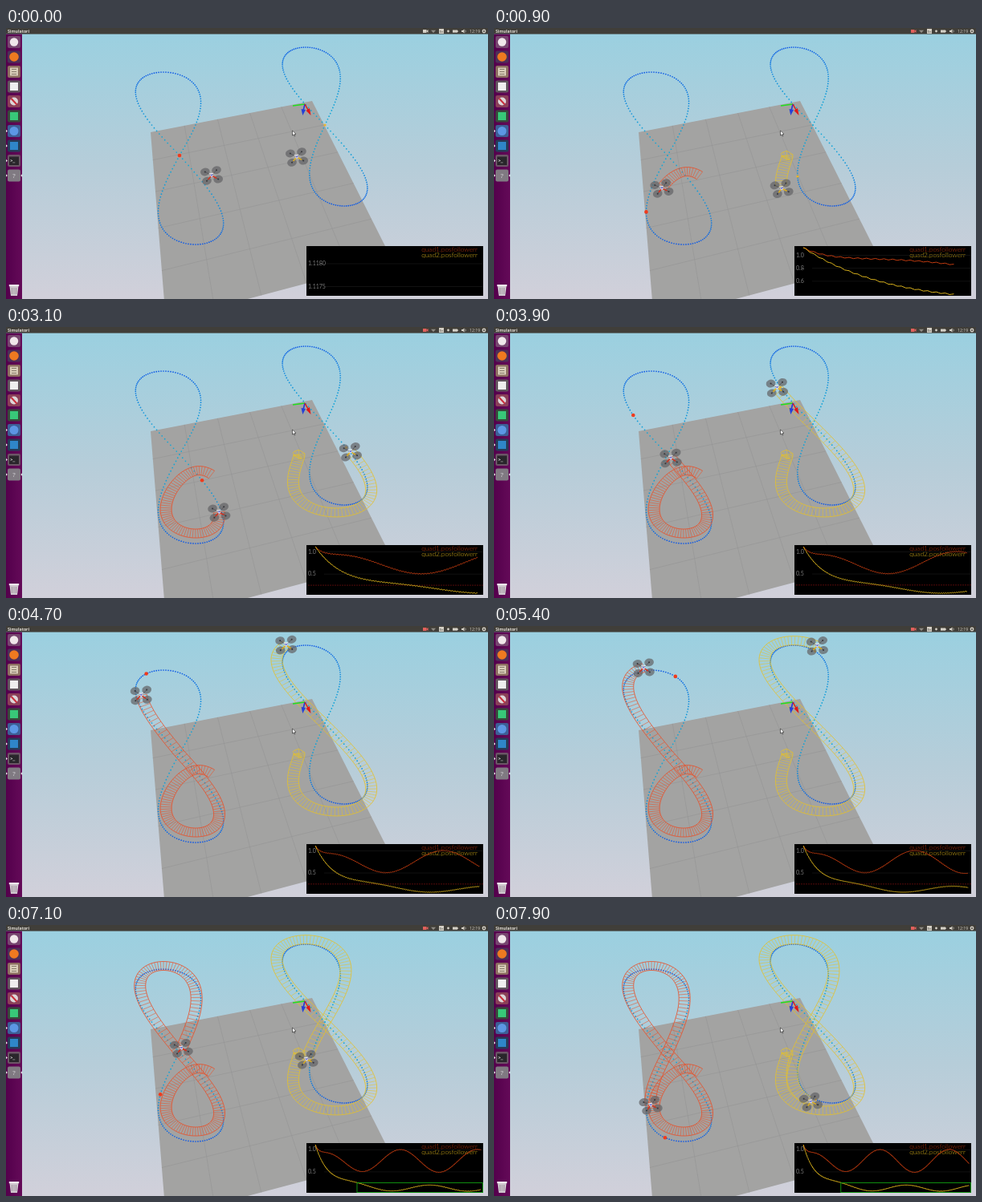
An HTML page with a canvas for the animation above (8 s loop, 600 px wide and 338 px high).

```html
<!DOCTYPE html>
<html lang="en">
<head>
<meta charset="utf-8">
<title>Simulator</title>
<style>
  html, body { margin: 0; width: 100%; height: 100%; overflow: hidden; background: #b6cdd8; }
  canvas { display: block; width: 600px; height: 338px; }
</style>
</head>
<body>
<canvas id="stage"></canvas>
<script>
const canvas = document.getElementById('stage');
const g = canvas.getContext('2d');
const ratio = window.devicePixelRatio || 1;
canvas.width = 600 * ratio;
canvas.height = 338 * ratio;

const LOOP = 8000, STEP = 100, TURN = 2 * Math.PI;
const PERIOD = 6.4, DELAY = .2;
const SANS = '"Open Sans", "Noto Sans", sans-serif';
const THIN = 'Lato, "Open Sans", sans-serif';

// Each drone starts off its course, then settles on a figure of eight some time behind the marker.
const drones = [
  {
    color: '#e94f28', arm: '#d8301c', marker: '#f03a1c', size: 2.3,
    x: 216, y: 159, lean: 20,
    course: { wide: 40, up: 104, down: 111 },
    flight: { wide: 34.5, up: 108, down: 98 },
    start: [40, 25], settle: .6, lag: .75
  },
  {
    color: '#e4c02c', arm: '#e0b020', marker: '#f0b428', size: 1.6,
    x: 397, y: 121, lean: 24,
    course: { wide: 35, up: 97, down: 101 },
    flight: { wide: 42, up: 103, down: 105 },
    start: [-35, 40], settle: .9, lag: .23
  }
];

const errors = [
  {
    color: '#c23c10',
    at: t => .75 + .26 * (1 - .5 * Math.exp(-t)) * wave(t, 3.65) + .266 * Math.exp(-6 * t)
  },
  {
    color: '#dcb41c',
    at: t => .13 + .07 * wave(t, 4.9) + 1.058 * Math.exp(-t / .62)
  }
];

function wave(t, peak) {
  return Math.cos(TURN * (t - peak) / 3.3);
}

function eight(d, size, angle) {
  const s = Math.sin(angle);
  return [
    d.x + d.lean * s - size.wide * Math.sin(2 * angle),
    d.y + s * (s > 0 ? size.down : size.up)
  ];
}

function markerAt(d, t) {
  return eight(d, d.course, TURN * Math.max(0, t - DELAY) / PERIOD);
}

function flightAt(d, t) {
  const delayed = t - d.lag * (1 - Math.exp(-t / d.lag));
  const [x, y] = eight(d, d.flight, TURN * delayed / PERIOD);
  const left = Math.exp(-t / d.settle);
  return [x + d.start[0] * left, y + d.start[1] * left];
}

// The two ends of the trail's cross bar, square to the heading.
function trailAt(d, t) {
  const [x, y] = flightAt(d, t), [nx, ny] = flightAt(d, t + .02);
  const turn = Math.atan2(ny - y, nx - x);
  const dx = -7 * Math.sin(turn), dy = 5.5 * Math.cos(turn);
  return [[x - dx, y - dy], [x + dx, y + dy]];
}

function rect(x, y, w, h, color) {
  g.fillStyle = color;
  g.fillRect(x, y, w, h);
}

function poly(pts, fill, stroke, width = 1, closed = true) {
  g.beginPath();
  for (let i = 0; i < pts.length; i += 2) g.lineTo(pts[i], pts[i + 1]);
  if (closed) g.closePath();
  if (fill) { g.fillStyle = fill; g.fill(); }
  if (stroke) { g.strokeStyle = stroke; g.lineWidth = width; g.stroke(); }
}

const line = (pts, color, width) => poly(pts, null, color, width, false);

function oval(x, y, rx, ry, color, turn = 0) {
  g.beginPath();
  g.ellipse(x, y, rx, ry, turn, 0, 7);
  g.fillStyle = color;
  g.fill();
}

const dot = (x, y, r, color) => oval(x, y, r, r, color);

function text(str, x, y, font, color, align = 'left') {
  g.font = font;
  g.fillStyle = color;
  g.textAlign = align;
  g.fillText(str, x, y);
}

// Unit square to the floor in perspective.
function floorAt(u, v) {
  const w = 1 + .064 * u - .31 * v;
  return [(180 + 225.4 * u - 42.7 * v) / w, (130 - 33.2 * u + 121.9 * v) / w];
}

function drawWorld() {
  const sky = g.createLinearGradient(0, 8, 0, 338);
  sky.addColorStop(0, '#9bd0e0');
  sky.addColorStop(.5, '#b6cdd9');
  sky.addColorStop(1, '#d1d0da');
  rect(0, 0, 600, 338, sky);
  poly([...floorAt(0, 0), ...floorAt(1, 0), ...floorAt(1, 1), ...floorAt(0, 1)], '#a3a3a2');
  for (let i = 1; i < 5; i++) {
    line([...floorAt(i / 5, 0), ...floorAt(i / 5, 1)], '#949494', .6);
    line([...floorAt(0, i / 5), ...floorAt(1, i / 5)], '#949494', .6);
  }
}

function drawCourse(d) {
  const n = 168;
  for (let i = 0; i < n; i++) {
    const angle = TURN * i / n, fast = Math.cos(angle) ** 2;
    const [x, y] = eight(d, d.course, angle);
    dot(x, y, .85, `rgb(15,${Math.round(88 + 80 * fast)},${Math.round(230 - 15 * fast)})`);
  }
}

function drawTrail(d, t) {
  const one = [], two = [];
  for (let s = 0; s < t; s += .05) {
    const [a, b] = trailAt(d, s);
    one.push(...a);
    two.push(...b);
    line([...a, ...b], d.color, .55);
  }
  line(one, d.color, .8);
  line(two, d.color, .8);
}

function drawMarker(d, t) {
  dot(...markerAt(d, t), d.size, d.marker);
}

function drawDrone(d, t) {
  const [x, y] = flightAt(d, t);
  const sway = Math.sin(TURN * t / PERIOD);
  const a = [8.2 + .6 * sway, 4.6 - .8 * sway], b = [6 - sway, -6.8];
  const ends = [a, a.map(v => -v), b, b.map(v => -v)];
  for (const [dx, dy] of ends) {
    oval(x + dx, y + dy, 5.9, 4.9, 'rgba(100,100,103,.72)', -.25);
    line([x, y, x + dx, y + dy], '#55555a', .9);
    dot(x + dx, y + dy, 1, '#38383c');
  }
  line([x, y, x + a[0] * .75, y + a[1] * .75], d.arm, 1.5);
  line([x, y, x - b[0] * .75, y - b[1] * .75], d.arm, 1.5);
  line([x - a[0] * .4, y - a[1] * .4, x + b[0] * .4, y + b[1] * .4], '#e6e6ee', 1.1);
  dot(x, y, 1.8, '#d8d8ec');
  dot(x, y - .6, 1, '#5a64d8');
}

function drawAxes() {
  line([372, 95, 357, 97], '#20e020', 1.5);
  line([372, 95, 370, 103], '#2038d8', 1.5);
  poly([367.5, 101, 373, 102, 369.3, 109], '#2440d8');
  line([372, 95, 377, 104], '#e01818', 1.5);
  poly([373.5, 103, 378, 100, 379.5, 109], '#e01818');
}

function drawCursor() {
  poly([356.5, 128, 356.5, 134, 358, 132.8, 359, 135, 360, 134.5, 359, 132.5, 361, 132.3], '#fff', '#222', .6);
}

function drawPlot(t) {
  const top = 1.118, left = 385, width = 209;
  rect(374, 272, 220, 62, '#000');
  text('quad1.posfollowerr', 587, 279, `300 8.4px ${THIN}`, '#b4340e', 'right');
  text('quad2.posfollowerr', 587, 285.6, `300 8.4px ${THIN}`, '#e0b81c', 'right');

  const tick = (label, y) => {
    line([396, y, 594, y], '#1d1d1d', .6);
    text(label, 376, y + 2, `300 7px ${THIN}`, '#dadada');
  };
  if (t === 0) {
    tick('1.1180', 294);
    tick('1.1175', 322.5);
    return;
  }

  let low = top;
  for (let s = 0; s <= t; s += .02) low = Math.min(low, errors[1].at(s));
  const span = top - low;
  const yOf = v => 274 + 58 * (top - v) / span;
  const xOf = s => left + width * s / (t + .1);
  const step = [.5, .2, .1].find(s => span > 1.8 * s) || .05;
  const digits = step < .1 ? 2 : 1;
  for (let v = Math.floor(top / step) * step; v > low + .01; v -= step) tick(v.toFixed(digits), yOf(v));

  g.save();
  g.beginPath();
  g.rect(374, 272, 220, 62);
  g.clip();
  const limit = yOf(.25), settled = t > 6.75;
  if (!settled) {
    g.setLineDash([2, 1]);
    line([376, limit, 594, limit], '#7a1010', .7);
    g.setLineDash([]);
  }
  for (const e of errors) {
    const pts = [];
    for (let s = 0; s <= t; s += .013) pts.push(xOf(s), yOf(e.at(s) + .008 * Math.sin(TURN * s / .052)));
    line(pts, e.color, 1);
  }
  if (settled) {
    const x = xOf(1.79);
    g.strokeStyle = '#12a012';
    g.lineWidth = .9;
    g.strokeRect(x, limit, 593.5 - x, 333.5 - limit);
  }
  g.restore();
}

function drawBar(t) {
  rect(0, 0, 600, 7.6, '#403e39');
  text('Simulatori', 2, 5.7, `bold 5.2px ${SANS}`, '#e4e0d8');
  const ink = '#d4d0c6';
  const cam = t > .4 ? '#e0605c' : ink;
  rect(519, 2, 4.5, 4, cam);
  poly([523, 4, 525.5, 2, 525.5, 6], cam);
  poly([529, 2.8, 535, 2.8, 532, 6.3], '#8d8a83');
  rect(539, 1, 6, 6, ink);
  text('En', 542, 5.7, `4px ${SANS}`, '#403e39', 'center');
  dot(550.5, 4, 1.4, ink);
  rect(556, 2.5, 6, 3.2, ink);
  rect(562, 3.3, .8, 1.6, ink);
  poly([567, 3, 568.5, 3, 570.5, 1.5, 570.5, 6.5, 568.5, 5, 567, 5], ink);
  line([571.7, 2.5, 572.3, 4, 571.7, 5.5], ink, .6);
  text('12:19', 577, 5.7, `5.2px ${SANS}`, ink);
  dot(595, 4, 2.4, ink);
  dot(595, 4, 1, '#403e39');
}

function drawDock() {
  const back = g.createLinearGradient(0, 0, 20, 0);
  back.addColorStop(0, '#54004c');
  back.addColorStop(1, '#640a58');
  rect(0, 7.6, 20, 331, back);
  const rowY = i => 17.5 + i * 18.5;
  const tiles = ['#76466f', '#4c3058', '#8c6e60', '#62565e', '#8a4058', '#384a3c', '#3d5f96', '#263c58', '#6b5566', '#807a82'];
  tiles.forEach((color, i) => {
    g.beginPath();
    g.roundRect(2, rowY(i) - 7.5, 16, 15, 2);
    g.fillStyle = color;
    g.fill();
  });
  const disc = (i, r, color) => dot(10, rowY(i), r, color);
  const square = (i, color) => rect(5, rowY(i) - 5, 10, 10, color);
  disc(0, 5.2, '#f0e6ea');
  disc(1, 5.8, '#ee7a20');
  square(2, '#d8cdb8');
  for (const y of [51, 54, 57]) rect(7, y, 6, .8, '#776a5c');
  square(3, '#eeeeee');
  disc(4, 5, '#ddd6d8');
  line([6.5, 88, 13.5, 95.5], '#c8303c', 2);
  square(5, '#38c878');
  disc(6, 5.5, '#5c96e4');
  square(7, '#2f86c8');
  rect(4, rowY(8) - 5, 12, 10.5, '#29262b');
  text('>_', 5.2, 167.3, 'bold 5px "DejaVu Sans Mono", monospace', '#eee');
  text('?', 10, 187, `8px ${SANS}`, '#dedbe0', 'center');
  for (let i = 6; i < 10; i++) poly([0, rowY(i) - 1.7, 1.8, rowY(i), 0, rowY(i) + 1.7], '#eee');
  poly([18.3, 184, 20, 182.2, 20, 185.8], '#eee');
  poly([4.5, 322, 15.5, 322, 14, 334, 6, 334], '#cfc8ce');
  rect(3.8, 320, 12.4, 2.2, '#ebe6ea');
  for (const x of [7.5, 10, 12.5]) line([x, 324, x, 332], '#8c7c8a', .7);
}

function draw(t) {
  g.setTransform(ratio, 0, 0, ratio, 0, 0);
  drawWorld();
  drones.forEach(drawCourse);
  for (const layer of [drawTrail, drawMarker]) drones.forEach(d => layer(d, t));
  drawAxes();
  drones.forEach(d => drawDrone(d, t));
  drawCursor();
  drawPlot(t);
  drawBar(t);
  drawDock();
}

const start = performance.now();
let shown = -1;
function frame() {
  const step = Math.floor((performance.now() - start) % LOOP / STEP);
  if (step !== shown) draw((shown = step) * STEP / 1000);
  requestAnimationFrame(frame);
}
frame();
</script>
</body>
</html>
```
